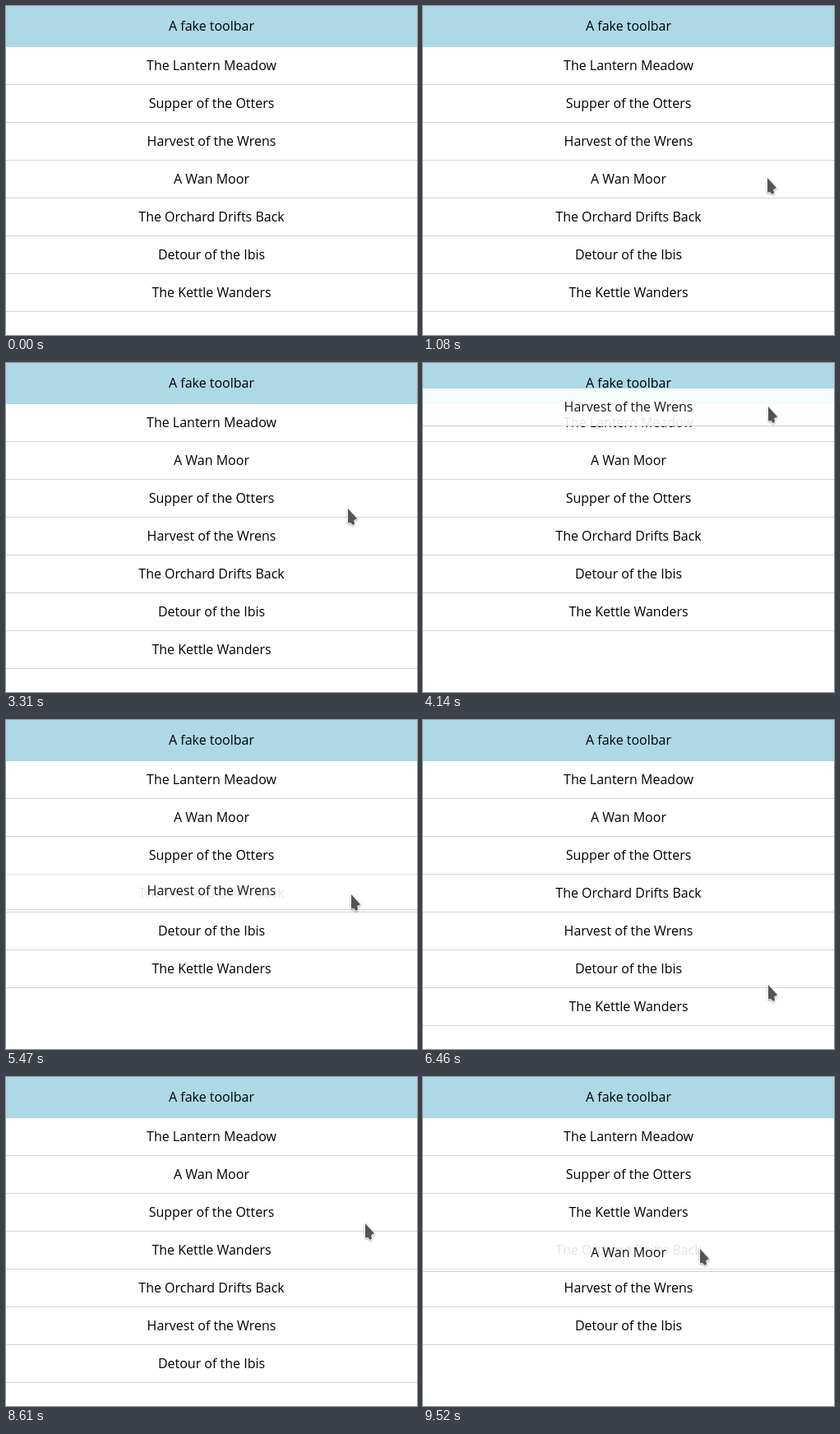
Recreate the animation shown at these times as an HTML page. Size 500 by 400 pixels, loop 9.54 s.

```html
<!DOCTYPE html>
<html lang="en">
<head>
<meta charset="utf-8">
<title>Sortable list</title>
<style>
  html, body { margin: 0; width: 100%; height: 100%; overflow: hidden; background: #fff; }
  #stage {
    position: relative; width: 500px; height: 400px; overflow: hidden;
    font: 16px "Open Sans", "Noto Sans", sans-serif; color: #000; text-align: center;
  }
  #stage > * { position: absolute; left: 0; top: 0; }
  .bar { width: 500px; height: 50px; line-height: 48px; background: lightblue; }
  .row {
    box-sizing: border-box; width: 500px; height: 46px; line-height: 44px;
    background: #fff; border-bottom: 1px solid #eaeaea;
  }
  .row.held { z-index: 1; opacity: .9; border-color: #ccc; }
  #stage > #lines {
    z-index: 2; top: 50px; width: 500px;
    background: repeating-linear-gradient(transparent 0 45px, rgba(70, 70, 70, .14) 45px 46px);
  }
  #cursor { z-index: 3; overflow: visible; filter: drop-shadow(0 1px 1px rgba(0, 0, 0, .35)); }
</style>
</head>
<body>
<div id="stage">
  <div class="bar">A fake toolbar</div>
  <div id="lines"></div>
  <svg id="cursor" width="14" height="22">
    <path d="M1 0V17.3H4.4L6.8 20 9.2 18.4 8.2 14.3 12.2 12.2Z"
      fill="#555" stroke="#fff" stroke-width="1.6" paint-order="stroke" stroke-linejoin="round"/>
  </svg>
</div>
<script>
const LOOP = 9540, TOP = 50, ROW = 46;
const titles = [
  'The Lantern Meadow', 'Supper of the Otters', 'Harvest of the Wrens', 'A Wan Moor',
  'The Orchard Drifts Back', 'Detour of the Ibis', 'The Kettle Wanders'
];

// Pointer moves; those with an item drag it, and drop it at slot `to`.
const origin = { x: 377, y: 50 };
const moves = [
  { start: 760, end: 1080, steps: 9, x: 418, y: 209, snap: 2 },
  { start: 2120, end: 2870, steps: 18, x: 428, y: 95, snap: 15.5, item: 3, to: 1, drop: 3020 },
  { start: 3230, end: 3390, steps: 5, x: 410, y: 210, snap: 2 },
  { start: 3860, end: 4140, steps: 8, x: 419, y: 53, snap: 2.5, item: 2, to: 0, drop: 4510 },
  { start: 4760, end: 4840, steps: 3, x: 419, y: 68, snap: 2 },
  { start: 5230, end: 5670, steps: 12, x: 419, y: 221, snap: 4.9, item: 2, to: 4, drop: 6010 },
  { start: 6220, end: 6620, steps: 11, x: 419, y: 349, snap: 2.2 },
  { start: 7010, end: 7340, steps: 9, x: 436, y: 182, snap: 2.5, item: 6, to: 3, drop: 7590 },
  { start: 8610, end: 8930, steps: 9, x: 335, y: 114, snap: 1.7, bend: 2 },
  { start: 9110, end: 9520, steps: 11, x: 336, y: 209, snap: 2.5, item: 3, to: 3, drop: LOOP }
];

const stage = document.getElementById('stage');
const lines = document.getElementById('lines');
const cursor = document.getElementById('cursor');
const rows = titles.map(title => {
  const row = document.createElement('div');
  row.className = 'row';
  row.textContent = title;
  stage.insertBefore(row, lines);
  return row;
});

const ease = (u, snap) => 1 - (1 - u ** 1.5) ** snap;
const mix = (a, b, p) => Math.round(a + (b - a) * p);
const place = (el, x, y) => { el.style.transform = `translate(${x}px, ${y}px)`; };

function draw(t) {
  const order = titles.map((_, i) => i);
  let held = -1, heldY = 0, from = origin, { x, y } = origin;

  for (const m of moves) {
    if (t < m.start) break;
    const stepTime = (m.end - m.start) / (m.steps - 1);
    const step = Math.min(m.steps, Math.floor((t - m.start) / stepTime + 1.001));
    const p = ease(step / m.steps, m.snap);
    x = mix(from.x, m.x, p ** (m.bend || 1));
    y = mix(from.y, m.y, p);

    if (m.item !== undefined) {
      const slot = order.indexOf(m.item);
      order.splice(slot, 1);
      if (t < m.drop) {
        // The held row trails the pointer by one step.
        const trail = step === m.steps ? 1 : ease((step - 1) / m.steps, m.snap);
        held = m.item;
        heldY = TOP + slot * ROW + mix(0, m.y - from.y, trail);
      } else {
        order.splice(m.to, 0, m.item);
      }
    }
    from = m;
  }

  order.forEach((item, slot) => place(rows[item], 0, TOP + slot * ROW));
  rows.forEach((row, i) => row.classList.toggle('held', i === held));
  if (held >= 0) place(rows[held], 0, heldY);
  lines.style.height = order.length * ROW + 'px';
  cursor.style.visibility = t < moves[0].start ? 'hidden' : 'visible';
  place(cursor, x, y);
}

function tick() {
  draw(performance.now() % LOOP);
  requestAnimationFrame(tick);
}
tick();
</script>
</body>
</html>
```
